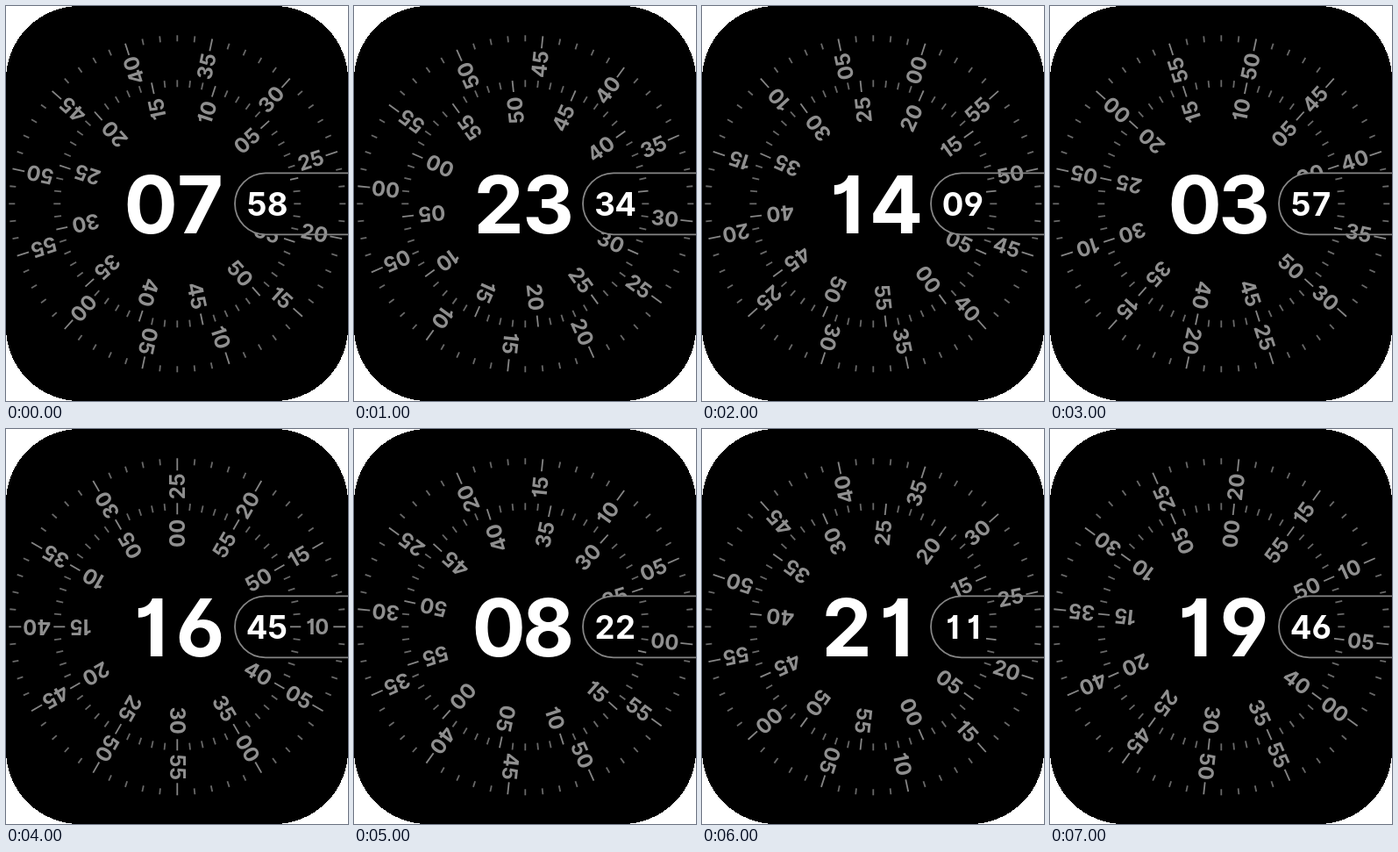
An HTML page that plays this animation: 390x450 px, repeating every 8000 ms.

```html
<!DOCTYPE html>
<html lang="en">
<head>
<meta charset="utf-8">
<title>Dial clock</title>
<style>
  html, body { margin: 0; width: 100%; height: 100%; overflow: hidden; background: #fff; }
  svg { display: block; width: 390px; height: 450px; }
  text {
    font-family: Inter, "Open Sans", sans-serif;
    font-weight: 700;
    font-feature-settings: "cv01", "cv03", "cv04"; /* flat one, open six and nine */
    text-anchor: middle;
    fill: #fff;
  }
  .label { font-size: 23.8px; fill: #8f8f8f; }
  #inner .label { text-anchor: end; }
  .tick { stroke: #686868; stroke-width: 1.8; }
  .tick.long { stroke: #858585; }
  #hour { font-size: 91px; }
  #minute { font-size: 36.5px; }
</style>
</head>
<body>
<svg viewBox="0 0 390 450">
  <rect width="390" height="450" rx="84" shape-rendering="crispEdges"/>
  <g transform="translate(195.3 225.3)">
    <g id="inner"></g>
    <g id="outer"></g>
  </g>
  <path d="M324 190.3H296a35 35 0 0 0 0 70H324z"/>
  <path d="M390 190.3H296a35 35 0 0 0 0 70H390" fill="none" stroke="#858585" stroke-width="1.8"/>
  <text id="hour" x="165.2 221.5" y="258.6"></text>
  <text id="minute" x="286 309.6" y="238.7"></text>
</svg>
<script>
  const STEP = 1000;
  // hour, minute, second
  const times = [
    [7, 58, 22], [23, 34, 31], [14, 9, 48], [3, 57, 37],
    [16, 45, 10], [8, 22, 1], [21, 11, 23], [19, 46, 6]
  ];

  const byId = id => document.getElementById(id);
  const pad = n => String(n).padStart(2, '0');

  function add(parent, tag, attrs, text = '') {
    const el = document.createElementNS('http://www.w3.org/2000/svg', tag);
    for (const key in attrs) el.setAttribute(key, attrs[key]);
    el.textContent = text;
    parent.append(el);
  }

  // Values run counter-clockwise, with zero at three o'clock.
  function buildDial(dial, edge, shortLen, longLen, labelX) {
    for (let v = 0; v < 60; v++) {
      const major = v % 5 === 0;
      const turn = `rotate(${-v * 6})`;
      add(dial, 'line', {
        class: major ? 'tick long' : 'tick',
        x1: edge - (major ? longLen : shortLen), x2: edge, transform: turn
      });
      if (major) add(dial, 'text', { class: 'label', x: labelX, y: 8.5, transform: turn }, pad(v));
    }
  }

  const inner = byId('inner'), outer = byId('outer');
  const hour = byId('hour'), minute = byId('minute');
  buildDial(inner, 141, 8, 13, 122.5);
  buildDial(outer, 192, 7, 14, 160);

  let shown = -1;
  function draw() {
    const i = Math.floor(performance.now() / STEP) % times.length;
    if (i !== shown) {
      shown = i;
      const [h, m, s] = times[i];
      hour.textContent = pad(h);
      minute.textContent = pad(m);
      inner.setAttribute('transform', `rotate(${m * 6})`);
      outer.setAttribute('transform', `rotate(${s * 6})`);
    }
    requestAnimationFrame(draw);
  }
  draw();
</script>
</body>
</html>
```
